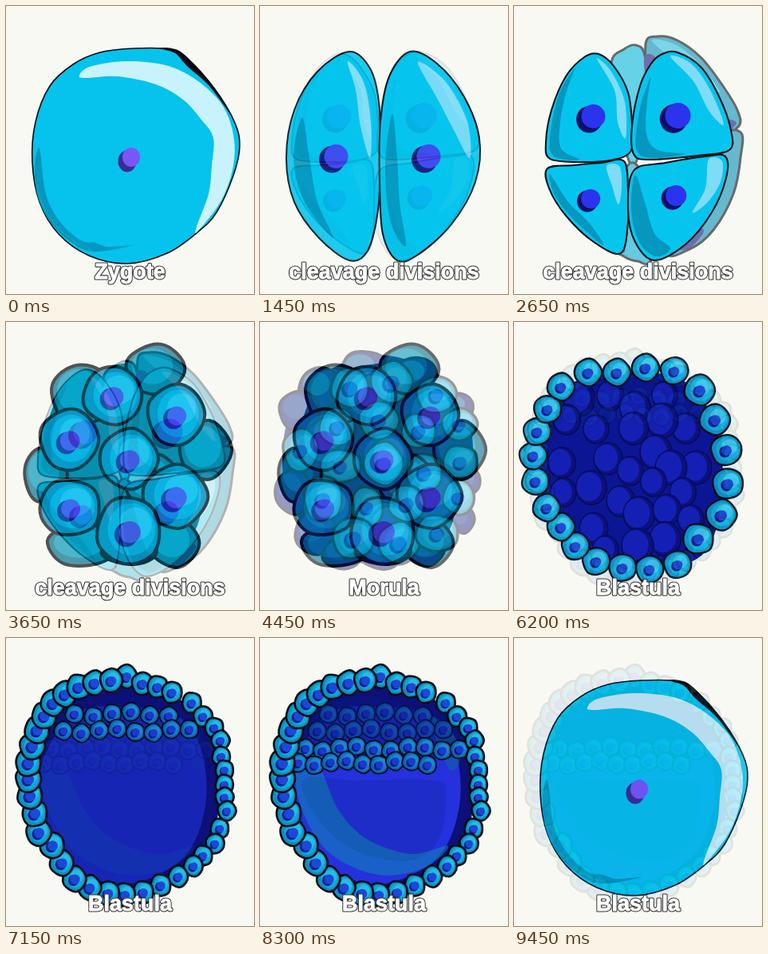
An HTML page with a canvas for the animation above (9.5 s loop, 311x360 px).

```html
<!DOCTYPE html>
<html lang="en">
<head>
<meta charset="utf-8">
<title>From zygote to blastula</title>
<style>
html, body { margin: 0; width: 100%; height: 100%; overflow: hidden; background: #f9f9f4; }
canvas { display: block; width: 311px; height: 360px; }
</style>
</head>
<body>
<canvas id="stage" width="311" height="360"></canvas>
<script>
const W = 311, H = 360, SLIDE = 950, HOLD = 500, STEP = 50;
const stage = document.getElementById('stage').getContext('2d');
let g; // context of the slide being painted

// Smooth closed curve through a flat list of coordinates
function blob(p, fill, width = 0, line = '#080c10') {
  const n = p.length / 2;
  const at = i => [p[(i + n) % n * 2], p[(i + n) % n * 2 + 1]];
  g.beginPath();
  g.moveTo(p[0], p[1]);
  for (let i = 0; i < n; i++) {
    const [a, b, c, d] = [at(i - 1), at(i), at(i + 1), at(i + 2)];
    g.bezierCurveTo(b[0] + (c[0] - a[0]) / 6, b[1] + (c[1] - a[1]) / 6,
      c[0] - (d[0] - b[0]) / 6, c[1] - (d[1] - b[1]) / 6, c[0], c[1]);
  }
  paint(fill, width, line);
}

function paint(fill, width, line) {
  if (fill) { g.fillStyle = fill; g.fill(); }
  if (width) { g.lineWidth = width; g.strokeStyle = line; g.stroke(); }
}

function oval(x, y, rx, ry, fill, width = 0, line = '#080c10') {
  g.beginPath();
  g.ellipse(x, y, rx, ry, 0, 0, 7);
  paint(fill, width, line);
}

function wobbly(x, y, rx, ry, fill, width) {
  const p = [];
  for (let k = 0; k < 9; k++) {
    const a = k * Math.PI * 2 / 9, r = 1 + 0.04 * Math.sin(k * 2.6 + x * 0.7 + y);
    p.push(x + rx * r * Math.cos(a), y + ry * r * Math.sin(a));
  }
  blob(p, fill, width);
}

function nucleus(x, y, r, color, dark) {
  oval(x - r * 0.25, y + r * 0.25, r * 1.08, r * 1.12, dark);
  oval(x + r * 0.1, y, r, r, color);
}

function cell(x, y, rx, ry, s) {
  wobbly(x, y, rx, ry, s.rim, s.width);
  oval(x + rx * 0.08, y - ry * 0.04, rx * 0.74, ry * 0.78, s.fill);
  oval(x + rx * 0.2, y - ry * 0.2, rx * 0.52, ry * 0.5, s.glow);
  nucleus(x, y + ry * 0.04, Math.min(rx, ry) * s.core, s.nucleus, s.dark);
}

// Calls draw with each group of `size` numbers
function each(list, size, draw) {
  for (let i = 0; i < list.length; i += size) draw(...list.slice(i, i + size));
}

function zygote() {
  blob([160,53, 205,54, 228,66, 262,104, 287,146, 293,176, 285,212, 264,258, 240,283, 202,309,
    152,322, 104,312, 66,285, 42,245, 33,195, 37,145, 55,100, 84,73, 118,58], '#05c3ec', 1.6);
  blob([192,53, 208,53, 224,61, 256,96, 282,136, 255,100, 228,76, 212,59], '#080c10');
  blob([92,87, 105,76, 150,69, 200,74, 238,92, 270,122, 285,160, 285,200, 270,243, 241,281,
    239,276, 254,235, 258,200, 260,165, 245,142, 222,117, 188,98, 140,88, 100,90], '#c9f3fc');
  blob([42,178, 36,200, 39,235, 52,265, 76,291, 108,307, 160,299, 128,301, 112,296, 94,293,
    68,270, 50,235], '#0597be');
  g.beginPath();
  g.moveTo(40, 232);
  g.quadraticCurveTo(55, 284, 106, 304);
  paint(null, 1, '#05afd8');
  oval(152, 194, 11.5, 13.5, '#3a2c92');
  oval(157, 189, 11, 12, '#7957f6');
}

function twoCells() {
  blob([112,57, 138,78, 149,120, 151,190, 148,255, 135,306, 112,318, 74,290, 43,245, 33,190,
    43,130, 72,82], '#05c5ee', 2);
  blob([188,57, 222,72, 255,112, 275,165, 270,220, 240,273, 198,311, 172,318, 154,285, 150,220,
    151,145, 162,88], '#05c5ee', 2);
  blob([53,140, 42,190, 56,245, 92,290, 72,245, 62,190], '#0597be');
  blob([166,135, 157,200, 164,270, 183,300, 175,245, 172,190], '#0597be');
  blob([110,69, 130,95, 139,145, 138,190, 126,150, 120,105], '#86def7');
  blob([198,70, 233,95, 260,145, 263,190, 243,155, 222,115], '#86def7');
  nucleus(94, 188, 15, '#4540f0', '#141470');
  nucleus(210, 188, 15, '#4540f0', '#141470');
}

function fourCells() {
  const body = p => blob(p, '#05c5ee', 2);
  const shade = p => blob(p, '#0597be');
  const light = p => blob(p, '#7edcf6');
  body([106,60, 125,75, 143,108, 148,150, 146,182, 120,193, 80,195, 45,191, 40,170, 47,130, 65,88, 88,64]);
  shade([76,78, 56,112, 45,165, 50,188, 82,192, 59,178, 58,145, 65,110]);
  light([104,66, 122,82, 139,120, 140,165, 130,145, 126,105]);
  body([186,60, 205,58, 235,77, 258,115, 272,155, 270,180, 230,187, 170,192, 150,185, 148,150, 158,100, 172,72]);
  shade([171,90, 158,128, 153,177, 171,190, 214,185, 180,180, 166,160, 167,120]);
  light([196,63, 222,72, 246,105, 263,148, 245,132, 225,94]);
  body([42,203, 75,199, 110,196, 138,194, 143,230, 143,270, 134,309, 100,295, 65,262, 44,228]);
  shade([45,210, 51,236, 74,266, 112,299, 95,272, 68,245]);
  light([116,200, 132,200, 135,225, 131,248, 123,225]);
  body([150,206, 190,196, 240,188, 265,188, 266,215, 248,258, 215,298, 176,318, 152,295, 143,255]);
  shade([152,211, 147,255, 157,295, 178,313, 196,303, 176,284, 164,245]);
  light([244,192, 261,194, 259,220, 243,245, 224,258, 240,228]);
  each([98,138,15, 204,137,16, 95,241,12, 202,237,13], 3,
    (x, y, r) => nucleus(x, y, r, '#2c33ee', '#0b1068'));
}

function eightCells() {
  const back = (p, fill) => blob(p, fill, 3);
  back([122,72, 138,54, 153,49, 164,62, 168,120, 150,200, 130,140], '#05b9df');
  back([165,48, 180,38, 205,43, 235,65, 262,100, 280,130, 282,150, 255,162, 200,155, 172,110], '#058eb8');
  back([283,157, 284,190, 275,235, 250,280, 220,304, 190,306, 200,220, 240,165], '#058eb8');
  back([122,296, 138,313, 155,319, 172,317, 178,250, 150,196, 130,230], '#05acd3');
  blob([173,44, 202,48, 232,72, 258,108, 220,82], '#28bfe4');
  blob([163,66, 170,60, 178,68, 167,92], '#151378');
  blob([266,142, 279,146, 267,158, 259,157], '#151378');
  blob([128,291, 137,294, 139,307, 132,306], '#151378');
  blob([199,300, 225,278, 238,282, 218,304], '#151378');
  fourCells();
}

function clump() {
  const s = { rim: '#0688b8', fill: '#0aaede', glow: '#2bc6ee', core: 0.34,
    nucleus: '#5747ee', dark: '#1c218c', width: 4 };
  blob([75,80, 185,55, 245,145, 235,265, 155,298, 75,280, 45,190], '#0a7894');
  each([187,59,36,31, 95,91,38,38, 250,160,32,36, 50,191,27,35, 96,279,44,26, 211,276,31,30,
    155,285,35,18, 185,200,35,34], 4, (x, y, rx, ry) => {
    wobbly(x, y, rx, ry, '#08718f', 4);
    oval(x - rx * 0.1, y - ry * 0.12, rx * 0.72, ry * 0.72, '#0799bb');
  });
  each([134,92,37,36, 213,116,35,38, 79,147,36,38, 154,171,36,37, 80,232,38,35, 212,218,40,39,
    154,261,40,42], 4, (x, y, rx, ry) => cell(x, y, rx, ry, s));
}

function morula() {
  const s = { rim: '#148fc2', fill: '#1ba8dc', glow: '#3dc0ea', core: 0.35,
    nucleus: '#1c55de', dark: '#0a1a84', width: 3.4 };
  blob([132,42, 215,60, 260,110, 266,205, 245,262, 180,300, 105,295, 45,240, 28,170, 50,90], '#07117a');
  each([131,58,29,22, 76,82,27,25, 195,65,26,21, 49,111,25,25, 249,106,19,17, 42,212,23,28,
    70,263,26,28, 103,290,25,19, 153,292,26,17, 207,285,24,20, 254,246,15,18, 264,199,12,16], 4,
    (x, y, rx, ry) => {
      wobbly(x, y, rx, ry, '#080f78', 3);
      oval(x - rx * 0.2, y - ry * 0.2, rx * 0.62, ry * 0.6, y < 110 ? '#0b5b9f' : '#0a2b91');
    });
  each([113,82,24,25, 165,75,26,26, 221,91,25,23, 97,131,23,24, 149,123,25,24, 199,136,22,22,
    250,128,22,20, 51,160,22,27, 101,180,26,21, 155,177,25,27, 206,188,23,24, 251,175,22,21,
    79,221,24,29, 134,231,21,25, 184,227,23,23, 249,219,20,22, 117,270,26,26, 174,276,26,26,
    222,264,27,23], 4, (x, y, rx, ry) => cell(x, y, rx, ry, s));
}

function solidBall() {
  const s = { rim: '#119cca', fill: '#17b6df', glow: '#43cfeb', core: 0.34,
    nucleus: '#2048d4', dark: '#0a1b85', width: 2.4 };
  blob([150,62, 215,75, 253,130, 261,215, 235,292, 150,309, 70,272, 32,195, 45,115, 90,70], '#0c1592');
  each([82,96, 121,92, 152,108, 189,92, 216,133, 186,123, 66,122, 103,134, 150,133, 60,176, 118,171,
    178,163, 146,186, 229,182, 197,182, 62,213, 97,207, 134,224, 212,213, 175,200, 157,240,
    192,235, 222,247, 100,258, 190,271, 155,280, 115,285], 2, (x, y) => {
    const r = 18 + 2 * Math.sin(x + y);
    oval(x, y, r, r + 2, '#0b0f78', 1.6, '#060a4c');
    oval(x - r * 0.14, y - r * 0.06, r * 0.82, r * 0.94, '#1420b4');
  });
  each([93,63, 129,63, 165,57, 201,61, 233,85, 252,122, 266,160, 268,202, 260,241, 231,271, 205,303,
    170,309, 136,307, 103,299, 77,280, 59,256, 41,232, 27,199, 24,167, 29,137, 42,109, 59,81], 2,
    (x, y) => {
      const r = x > 220 ? 19 : 17;
      cell(x, y, r, r, s);
    });
}

const small = { rim: '#0c8fc0', fill: '#12a8d6', glow: '#25bce4', core: 0.42,
  nucleus: '#1d48d6', dark: '#0a2090', width: 2.6 };
const inner = { rim: '#0c62b0', fill: '#127ac6', glow: '#1b88d0', core: 0.42,
  nucleus: '#1d38cc', dark: '#0a1888', width: 1.8 };

function ring() {
  each([151,48, 171,57, 190,61, 208,68, 233,81, 247,98, 261,112, 269,128, 270,148, 274,165, 274,183,
    274,199, 277,216, 268,238, 262,257, 247,272, 235,285, 216,298, 194,309, 172,318, 149,321, 128,319,
    105,312, 86,301, 70,281, 58,259, 41,243, 36,219, 30,197, 28,176, 28,156, 33,135, 39,115, 48,97,
    59,81, 74,70, 91,61, 111,56, 132,53], 2, (x, y) => {
    const r = 14 - (x - 150) / 55;
    cell(x, y, r * 0.96, r * 1.04, small);
  });
}

function row(y, from, to, count) {
  for (let i = 0; i < count; i++) {
    const x = from + (to - from) * i / (count - 1);
    cell(x, y + 3 * Math.sin(i * 1.7), 11.5, 11.5, inner);
  }
}

function cavity(color) {
  blob([150,58, 215,75, 258,120, 268,205, 240,278, 150,316, 75,282, 40,225, 35,150, 75,78], '#0c1078');
  blob([150,86, 215,98, 245,140, 250,210, 222,275, 150,308, 84,285, 48,235, 42,165, 85,95], color);
}

function upperRows() {
  row(95, 86, 204, 6);
  row(116, 72, 230, 8);
}

function lowerRows() {
  row(138, 57, 250, 10);
  row(156, 48, 210, 9);
}

function earlyBlastula() {
  cavity('#1524b0');
  upperRows();
  ring();
}

function middleBlastula() {
  cavity('#2430dc');
  blob([56,130, 44,172, 57,225, 90,271, 148,296, 205,288, 236,260, 190,270, 135,252, 99,216, 78,168],
    '#0d8fb4');
  blob([214,98, 242,120, 251,151, 239,165, 222,130], '#0b6c98');
  upperRows();
  lowerRows();
  ring();
}

function lateBlastula() {
  cavity('#2632dc');
  blob([65,80, 150,75, 245,112, 250,148, 150,145, 42,145], '#0b1680');
  blob([55,177, 120,178, 220,178, 233,195, 225,250, 190,278, 120,266, 72,225], '#1c2bb6');
  lowerRows();
  ring();
}

const slides = [
  [zygote, 'Zygote'],
  [twoCells, 'cleavage divisions'],
  [fourCells, 'cleavage divisions'],
  [eightCells, 'cleavage divisions'],
  [clump, 'Morula'],
  [morula, 'Morula'],
  [solidBall, 'Blastula'],
  [earlyBlastula, 'Blastula'],
  [middleBlastula, 'Blastula'],
  [lateBlastula, 'Blastula']
].map(([draw, label]) => {
  const picture = document.createElement('canvas');
  picture.width = W;
  picture.height = H;
  g = picture.getContext('2d');
  g.lineJoin = g.lineCap = 'round';
  g.fillStyle = '#f9f9f4';
  g.fillRect(0, 0, W, H);
  draw();
  return { picture, label };
});

function caption(label) {
  stage.font = 'bold 27px "Liberation Sans", Arial, sans-serif';
  stage.textAlign = 'center';
  stage.lineJoin = 'round';
  for (const [color, width] of [['#333', 3], ['#fff', 0.9]]) {
    stage.strokeStyle = color;
    stage.lineWidth = width;
    stage.strokeText(label, 155.5, 341);
  }
  stage.fillStyle = '#fff';
  stage.fillText(label, 155.5, 341);
}

function frame() {
  const t = performance.now() % (SLIDE * slides.length);
  const i = Math.floor(t / SLIDE);
  const fade = t % SLIDE - HOLD;
  stage.globalAlpha = 1;
  stage.drawImage(slides[i].picture, 0, 0);
  if (fade >= 0) {
    stage.globalAlpha = (Math.floor(fade / STEP) + 1) / 10;
    stage.drawImage(slides[(i + 1) % slides.length].picture, 0, 0);
    stage.globalAlpha = 1;
  }
  caption(slides[i].label);
  requestAnimationFrame(frame);
}
frame();
</script>
</body>
</html>
```
